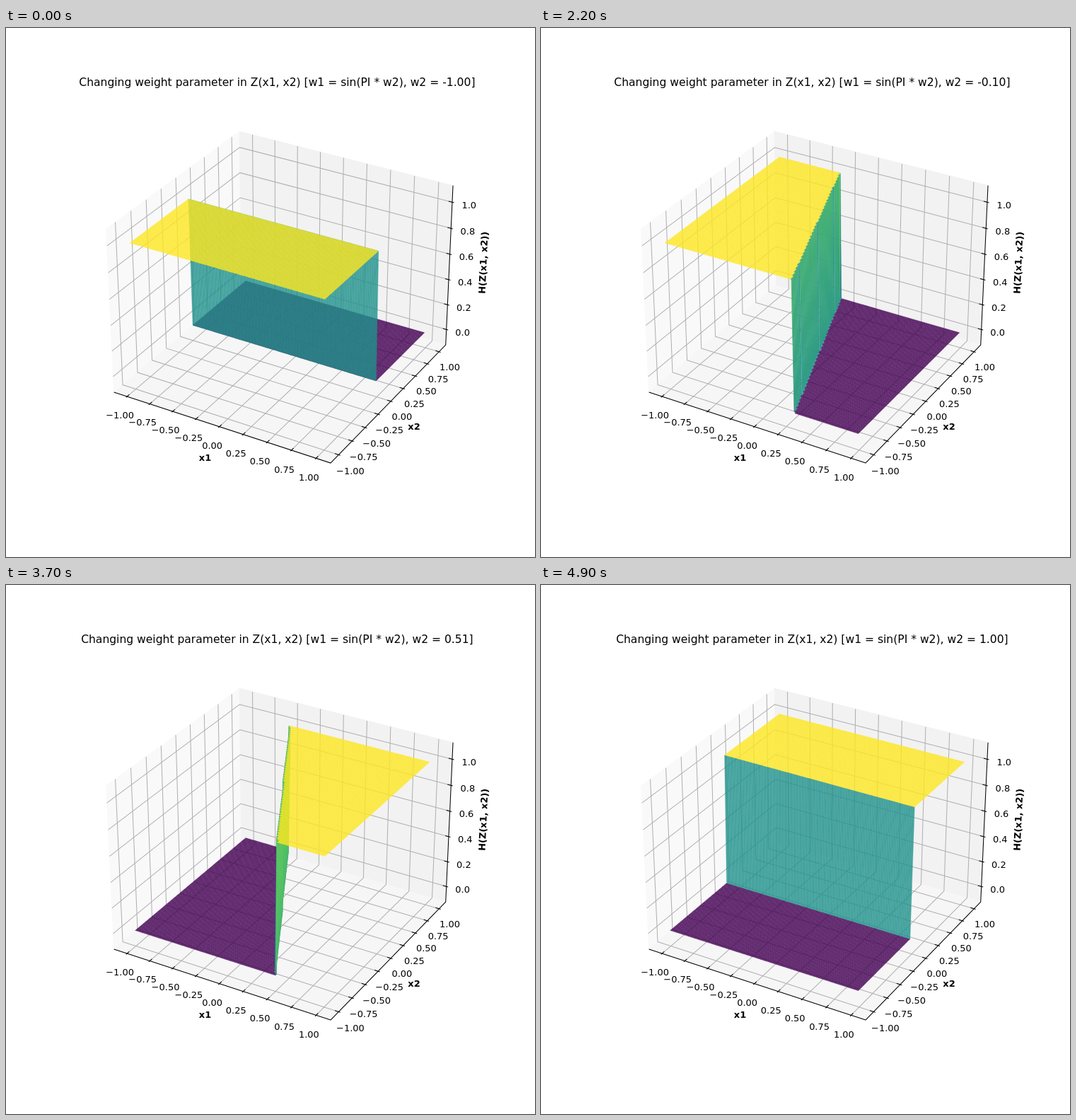
Write an HTML page with a canvas that moves like this. It is 748 by 748 pixels and loops after 5000 ms.

```html
<!DOCTYPE html>
<html lang="en">
<head>
<meta charset="utf-8">
<title>Step surface</title>
<style>
html, body { margin: 0; width: 100%; height: 100%; overflow: hidden; background: #fff; }
canvas { display: block; }
</style>
</head>
<body>
<canvas id="plot" width="748" height="748"></canvas>
<script>
const ctx = document.getElementById('plot').getContext('2d');
const FONT = '"DejaVu Sans", Verdana, sans-serif';
const PT = 1.2965;                                  // pixels per point
const N = 101, STEPS = 50, STEP_MS = 100;
const E = 1.1 * 25 / 24, Z0 = -0.125, Z1 = 1.125;   // box limits
const VIRIDIS = ['68,1,84', '59,82,139', '33,145,140', '94,201,98', '253,231,37'];
const MINUS = '\u2212';

// Perspective view, azimuth -60, elevation 30; returns [screen x, screen y, depth]
function project(x, y, z) {
  const a = x * 0.519481, b = y * 0.519481, c = (z - 0.5) / 1.4;
  const depth = 10 - (0.433013 * a - 0.75 * b + 0.5 * c);
  const k = 2948 / depth;
  return [
    391.5 + k * (0.866025 * a + 0.5 * b),
    369.4 - k * (-0.25 * a + 0.433013 * b + 0.866025 * c),
    depth
  ];
}

function trace(points, close) {
  ctx.beginPath();
  for (const p of points) ctx.lineTo(p[0], p[1]);
  if (close) ctx.closePath();
}

function pane(color, ...corners) {
  trace(corners.map(c => project(...c)), true);
  ctx.fillStyle = ctx.strokeStyle = color;
  ctx.fill();
  ctx.stroke();
}

function line(color, ...corners) {
  trace(corners.map(c => project(...c)));
  ctx.strokeStyle = color;
  ctx.stroke();
}

function text(str, x, y, points = 10, weight = 'normal') {
  ctx.font = `${weight} ${points * PT}px ${FONT}`;
  ctx.textAlign = 'center';
  ctx.fillStyle = '#000';
  ctx.fillText(str, x, y);
}

const fixed = v => v.toFixed(2).replace('-', MINUS);
const ticks = Array.from({ length: 9 }, (_, i) => i / 4 - 1);
const zTicks = Array.from({ length: 6 }, (_, i) => i / 5);

function drawAxes() {
  const grid = '#b0b0b0', out = 0.0183, inn = 0.0367, pad = 0.125, drop = 0.094;
  ctx.lineWidth = 0.8 * PT;
  pane('#f9f9f9', [-E, -E, Z0], [-E, E, Z0], [-E, E, Z1], [-E, -E, Z1]);
  pane('#f2f2f2', [-E, E, Z0], [E, E, Z0], [E, E, Z1], [-E, E, Z1]);
  pane('#f6f6f6', [-E, -E, Z0], [E, -E, Z0], [E, E, Z0], [-E, E, Z0]);

  for (const t of ticks) {
    line(grid, [t, -E, Z0], [t, E, Z0], [t, E, Z1]);
    line(grid, [E, t, Z0], [-E, t, Z0], [-E, t, Z1]);
  }
  for (const t of zTicks) line(grid, [-E, -E, t], [-E, E, t], [E, E, t]);

  line('#000', [-E, -E, Z0], [E, -E, Z0], [E, E, Z0], [E, E, Z1]);
  for (const t of ticks) {
    line('#000', [t, -E - out, Z0], [t, -E + inn, Z0]);
    line('#000', [E + out, t, Z0], [E - inn, t, Z0]);
    const a = project(t, -E - pad, Z0 - drop), b = project(E + pad, t, Z0 - drop);
    text(fixed(t), a[0] - 0.2, a[1] + 4.8);
    text(fixed(t), b[0] - 0.6, b[1] + 4.8);
  }
  for (const t of zTicks) {
    line('#000', [E + out, E, t], [E - inn, E, t]);
    const c = project(E + pad, E + pad, t);
    text(t.toFixed(1), c[0] - 1.8, c[1] + 11.8);
  }

  text('x1', 281.5, 612, 10, 'bold');
  text('x2', 577, 568, 10, 'bold');
  ctx.save();
  ctx.translate(679.5, 332);
  ctx.rotate(-87.5 * Math.PI / 180);
  text('H(Z(x1, x2))', 0, 0, 10, 'bold');
  ctx.restore();
}

// Mesh from -1 to 0.99; the tiny offset puts the middle vertex just above zero
const coord = i => Math.min(-1 + i * 0.02, 0.99) + 1e-15;

// Both possible screen places of every mesh vertex
const mesh = [];
for (let j = 0; j < N; j++)
  for (let i = 0; i < N; i++)
    mesh.push([0, 1].map(z => project(coord(i), coord(j), z)));

function drawSurface(w1, w2) {
  const high = mesh.map((_, k) =>
    w1 * coord(k % N) + w2 * coord(Math.floor(k / N)) >= 0 ? 1 : 0);
  const quads = [];
  for (let j = 0; j < N - 1; j++)
    for (let i = 0; i < N - 1; i++) {
      const k = j * N + i, ids = [k, k + 1, k + N + 1, k + N];
      const points = ids.map(id => mesh[id][high[id]]);
      quads.push({
        points,
        level: ids.reduce((s, id) => s + high[id], 0),
        depth: points.reduce((s, p) => s + p[2], 0)
      });
    }
  quads.sort((a, b) => b.depth - a.depth);
  ctx.lineWidth = 0.2 * PT;
  ctx.lineJoin = 'bevel';
  for (const q of quads) {
    trace(q.points, true);
    ctx.fillStyle = ctx.strokeStyle = `rgba(${VIRIDIS[q.level]},0.8)`;
    ctx.fill();
    ctx.stroke();
  }
}

function draw(step) {
  const w2 = 2 * step / (STEPS - 1) - 1, w1 = Math.sin(Math.PI * w2);
  ctx.fillStyle = '#fff';
  ctx.fillRect(0, 0, 748, 748);
  drawAxes();
  drawSurface(w1, w2);
  text(`Changing weight parameter in Z(x1, x2) [w1 = sin(PI * w2), w2 = ${w2.toFixed(2)}]`,
    383.4, 82, 12);
}

let shown = -1;
function tick() {
  const step = Math.floor(performance.now() / STEP_MS) % STEPS;
  if (step !== shown) draw(shown = step);
  requestAnimationFrame(tick);
}
tick();
</script>
</body>
</html>
```
